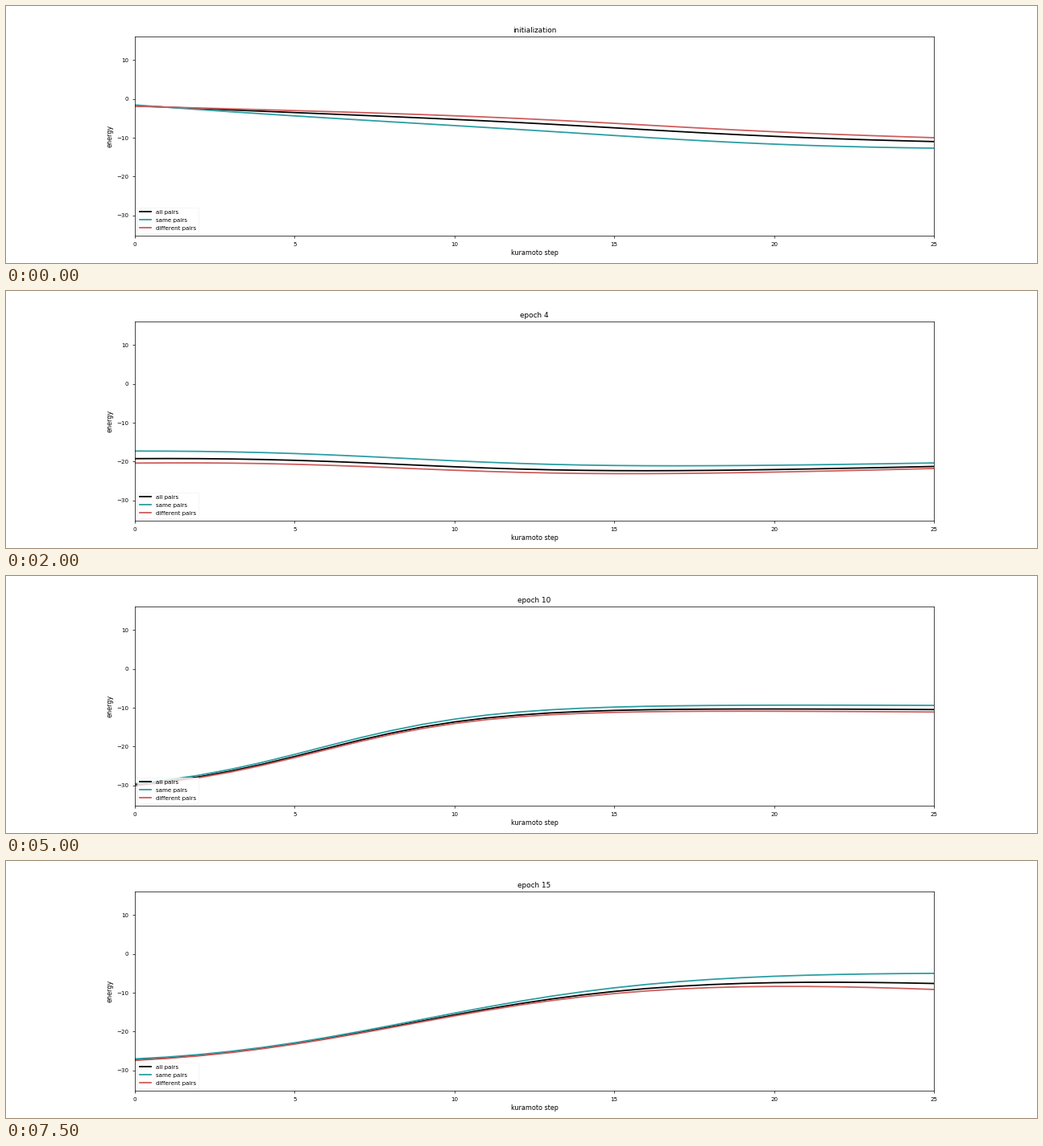
Write a matplotlib script that moves like this. It is 1280 px wide and 320 px high and loops after 8 s.

```python
import numpy as np
import matplotlib.pyplot as plt
from matplotlib.animation import FuncAnimation

plt.rcParams.update({
    "font.family": "DejaVu Sans",
    "axes.titlesize": 10,
    "axes.labelsize": 9,
    "xtick.labelsize": 8,
    "ytick.labelsize": 8,
    "legend.fontsize": 8,
    "xtick.major.pad": 6,
    "ytick.major.pad": 5.5,
})

STEPS = np.arange(26)
SAME_SHARE = 0.37  # share of same pairs among all pairs

# Energy of different pairs at step 0, per epoch
STARTS = [-1.9, -1.3, 2.8, 2.6, -20.4, -27, -31.8, -28.8,
          -29.2, -33.4, -30.1, -28, -27, -26.4, -26.2, -27.45]

# epoch: rise, midpoint, width, drift; lead of same pairs at start, middle, end
SHAPES = {
    0: (-3, 16, 3, -0.21, 0.35, -2.9, -2.7),
    3: (-14.6, 8.5, 4, 0.22, 4.4, 2.7, 1.9),
    6: (6.7, 8.4, 2, 0.22, 0.5, 1.4, 0.5),
    8: (26.3, 5.8, 2.8, -0.2, 1, 1.6, 3.4),
    10: (23, 5.7, 2.7, -0.06, 0.5, 1.25, 1.7),
    12: (26, 8.3, 4, -0.2, 0.8, 1.1, 3.15),
    15: (36.5, 8.5, 4.5, -0.5, 0.4, 1.05, 4.15),
}


def logistic(x):
    return 1 / (1 + np.exp(-x))


def parabola(start, middle, end):
    """Curve through three values spread evenly over the steps."""
    u = STEPS / STEPS[-1]
    return (start * (1 - u) * (1 - 2 * u)
            + middle * 4 * u * (1 - u)
            + end * u * (2 * u - 1))


def energies(epoch):
    """Sigmoid plus linear drift, its shape blended between key epochs."""
    rise, mid, width, drift, *lead = (
        np.interp(epoch, list(SHAPES), values)
        for values in zip(*SHAPES.values()))
    climb = logistic((STEPS - mid) / width) - logistic(-mid / width)
    diff = STARTS[epoch] + rise * climb + drift * STEPS
    gap = parabola(*lead)
    return diff + SAME_SHARE * gap, diff + gap, diff


fig, ax = plt.subplots(figsize=(20, 5), dpi=64)
fig.subplots_adjust(bottom=0.107)
styles = [("all pairs", "black"),
          ("same pairs", "#2a9da2"),
          ("different pairs", "#cd5c5c")]
lines = [ax.plot(STEPS, 0 * STEPS, color=color, lw=2, label=label)[0]
         for label, color in styles]
ax.set(xlim=(0, 25), ylim=(-35.2, 16))
ax.set_xlabel("kuramoto step", labelpad=3)
ax.set_ylabel("energy")
ax.set_xticks(range(0, 26, 5))
ax.set_yticks(range(-30, 11, 10))
ax.legend(loc="lower left", framealpha=0.8, edgecolor="0.95",
          borderaxespad=0.45, labelspacing=0.57)
title = ax.set_title("initialization")


def update(epoch):
    for line, y in zip(lines, energies(epoch)):
        line.set_ydata(y)
    title.set_text(f"epoch {epoch}" if epoch else "initialization")
    return [*lines, title]


anim = FuncAnimation(fig, update, frames=len(STARTS), interval=500,
                     repeat=True, repeat_delay=0,
                     init_func=lambda: update(0))
plt.show()
```
